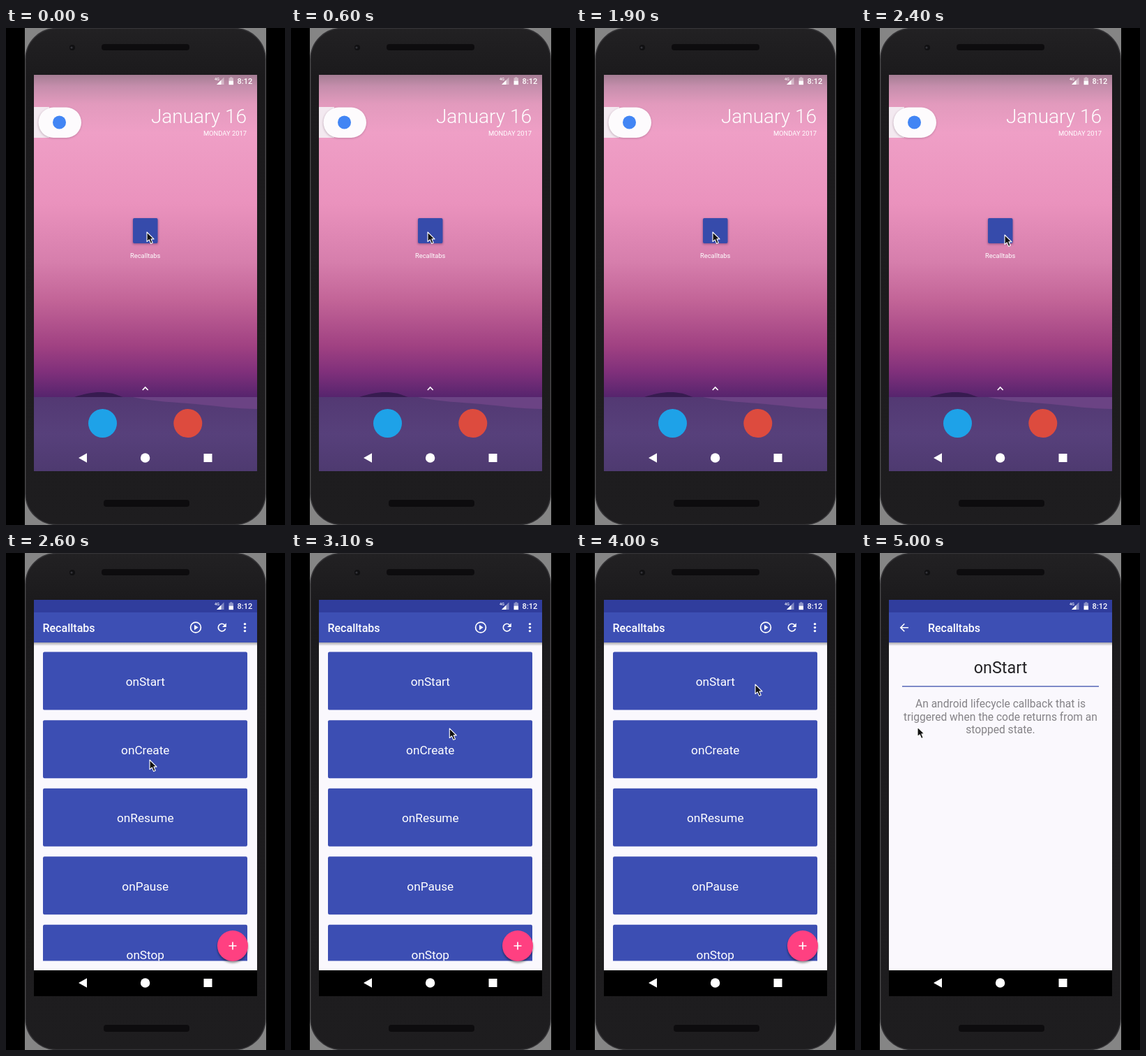
These frames come from a looping animation (400x711 px, 5100 ms). An HTML page:

```html
<!DOCTYPE html>
<html lang="en">
<head>
<meta charset="utf-8">
<title>Phone demo</title>
<style>
html, body { margin: 0; width: 100%; height: 100%; overflow: hidden; background: #000; }
svg { display: block; width: 400px; height: 711px; font-family: Roboto, sans-serif; }
.mid { text-anchor: middle; }
.end { text-anchor: end; }
.bold { font-weight: 500; }
</style>
</head>
<body>
<svg viewBox="0 0 400 711">
  <defs>
    <linearGradient id="sky" x2="0" y2="1">
      <stop offset="0" stop-color="#a47d93"/>
      <stop offset=".035" stop-color="#c58eac"/>
      <stop offset=".09" stop-color="#e29abd"/>
      <stop offset=".18" stop-color="#ef9fc6"/>
      <stop offset=".4" stop-color="#ea92bd"/>
      <stop offset=".58" stop-color="#d67eac"/>
      <stop offset=".7" stop-color="#c26497"/>
      <stop offset=".84" stop-color="#a04182"/>
      <stop offset=".92" stop-color="#80307b"/>
      <stop offset="1" stop-color="#55246d"/>
    </linearGradient>
    <linearGradient id="ground" x2="0" y2="1">
      <stop offset="0" stop-color="#533973"/>
      <stop offset=".5" stop-color="#57407b"/>
      <stop offset="1" stop-color="#4e3a70"/>
    </linearGradient>
    <linearGradient id="shade" x2="0" y2="1">
      <stop offset="0" stop-opacity=".32"/>
      <stop offset="1" stop-opacity="0"/>
    </linearGradient>
    <linearGradient id="body" x2="0" y2="1">
      <stop offset="0" stop-color="#222123"/>
      <stop offset=".1" stop-color="#1b1a1c"/>
      <stop offset="1" stop-color="#1e1d1f"/>
    </linearGradient>
    <filter id="soft" x="-30%" y="-30%" width="160%" height="160%"><feGaussianBlur stdDeviation="1.6"/></filter>
    <clipPath id="listClip"><rect x="40" y="128" width="320" height="455.5"/></clipPath>
  </defs>

  <rect width="400" height="711"/>
  <rect x="27" width="346" height="711" fill="#858585"/>
  <rect x="28" y=".5" width="344" height="710" rx="44" fill="url(#body)" stroke="#353437" stroke-width="1.4"/>
  <rect x="137" y="23" width="126" height="9" rx="4" fill="#0d0c0e"/>
  <rect x="140" y="675" width="123" height="10" rx="4" fill="#0d0c0e"/>
  <circle cx="95" cy="28" r="4" fill="#101012"/>
  <circle cx="94" cy="28" r="1.6" fill="#343439"/>

  <g id="home">
    <rect x="40" y="67" width="320" height="462" fill="url(#sky)"/>
    <path d="M98 528C116 522 130 520 144 521.5S160 526 168 528Z" fill="#371b50"/>
    <rect x="40" y="528" width="320" height="106" fill="url(#ground)"/>
    <path d="M182 528H360V545C330 545 305 541 272 538S215 535 182 528Z" fill="#6b4384"/>
    <path d="M40 113H62V157H40Z" fill="#f3e9f0"/>
    <rect x="46" y="114.5" width="62" height="43.5" rx="21.7" fill="#603050" opacity=".3" filter="url(#soft)"/>
    <rect x="46.5" y="113.5" width="61.5" height="43.5" rx="21.7" fill="#fdfbfd"/>
    <circle cx="76.5" cy="135" r="9.5" fill="#4285f4"/>
    <g fill="#fff">
      <text class="end" x="345" y="136" font-size="28" font-weight="300">January 16</text>
      <text class="end" x="345" y="154" font-size="9.4">MONDAY 2017</text>
      <text class="mid name" x="199.7" y="329" font-size="9.3"></text>
    </g>
    <rect x="181.5" y="273" width="36.5" height="36.5" rx="2" fill="#3c1c4c" opacity=".4" filter="url(#soft)"/>
    <rect id="icon" x="182" y="272" width="35.5" height="36" rx="2"/>
    <path d="M195.8 518L199.7 514 203.6 518" fill="none" stroke="#fff" stroke-width="1.7"/>
    <circle cx="138.5" cy="565.5" r="20.5" fill="#1ea2e8"/>
    <circle cx="260.8" cy="565.5" r="20.5" fill="#dd4b3e"/>
  </g>

  <g id="app">
    <rect x="40" y="67" width="320" height="567" fill="#faf8fd"/>
    <g id="list">
      <g id="cards" clip-path="url(#listClip)"></g>
      <circle cx="325" cy="564.5" r="22" opacity=".4" filter="url(#soft)"/>
      <circle cx="325" cy="562" r="22" fill="#ff4081"/>
      <path d="M319.5 562H330.5M325 556.5V567.5" stroke="#fff" stroke-width="1.7"/>
    </g>
    <g id="detail">
      <text class="mid" x="200" y="171.8" font-size="23.4" fill="#242326">onStart</text>
      <path d="M59 190.7H341" stroke="#5969b8" stroke-width="1.5"/>
      <g class="mid" font-size="15.6" fill="#858387">
        <text x="200" y="221">An android lifecycle callback that is</text>
        <text x="200" y="239.5">triggered when the code returns from an</text>
        <text x="200" y="258">stopped state.</text>
      </g>
    </g>
    <rect x="40" y="128" width="320" height="5" fill="url(#shade)"/>
    <rect x="40" y="67" width="320" height="18.5" fill="#303d9d"/>
    <rect x="40" y="85" width="320" height="43" fill="#3d4fb4"/>
    <text id="title" class="name bold" y="113" font-size="16" fill="#fff"></text>
    <g id="tools" fill="none" stroke="#fff" stroke-width="1.7">
      <circle cx="272" cy="106.5" r="7.4"/>
      <path d="M270 102.8L275.6 106.5 270 110.2Z" fill="#fff" stroke="none"/>
      <path d="M314.6 108.2A5.3 5.3 0 1 1 313.3 102.8"/>
      <path d="M315.8 100.2V106H310Z" fill="#fff" stroke="none"/>
      <g fill="#fff" stroke="none">
        <circle cx="342.5" cy="101.6" r="1.7"/>
        <circle cx="342.5" cy="106.6" r="1.7"/>
        <circle cx="342.5" cy="111.6" r="1.7"/>
      </g>
    </g>
    <path id="back" d="M68 106.7H57M62.3 101.2L56.8 106.7 62.3 112.2" fill="none" stroke="#fff" stroke-width="1.6"/>
    <rect x="40" y="597" width="320" height="37"/>
  </g>

  <g fill="#fff">
    <text class="end bold" x="353.3" y="80" font-size="11">8:12</text>
    <text class="bold" x="299" y="75" font-size="5.5">4G</text>
    <path d="M302 81L312.5 70.5V81Z" opacity=".4"/>
    <path d="M302 81L308.5 74.5V81Z"/>
    <path d="M319.5 71.5H321.3V70.2H324.2V71.5H326V75.5H319.5Z" opacity=".45"/>
    <rect x="319.5" y="75.5" width="6.5" height="5.7"/>
    <path d="M104 615L116 608.3V621.7Z"/>
    <circle cx="199.6" cy="615" r="6.7"/>
    <rect x="283.5" y="609" width="12" height="12"/>
  </g>
  <path id="cursor" d="M0 0V13.6L3.2 10.8 5.6 16.4 8.2 15.3 5.9 9.9H10Z" fill="#111" stroke="#fff" stroke-width="1.1" stroke-linejoin="round"/>
</svg>
<script>
const LOOP = 5100, STEP = 100;
const OPEN = 2500, DETAIL = 4200;
const PRESS = [1300, 1900];
const $ = id => document.getElementById(id);
const show = (id, on) => $(id).setAttribute("display", on ? "inline" : "none");

// Pointer stops: time, x, y
const stops = [
  [0, 202, 292], [500, 196, 292], [1900, 196, 292], [2300, 206, 296],
  [2700, 206, 296], [3600, 257, 188], [4200, 257, 188], [4900, 81, 249]
];

document.querySelectorAll(".name").forEach(el => el.textContent = "Recalltabs");
$("cards").innerHTML = ["onStart", "onCreate", "onResume", "onPause", "onStop"].map((label, i) => {
  const y = 141.6 + i * 97.55;
  return `<rect x="53" y="${y}" width="293" height="83" rx="2.2" fill="#3c4eb3"/>
    <text class="mid" x="199.8" y="${y + 48.7}" font-size="17.2" fill="#fff">${label}</text>`;
}).join("");

function pointer(t) {
  const i = stops.findIndex(s => s[0] > t);
  if (i < 0) return stops[stops.length - 1].slice(1);
  const [t0, x0, y0] = stops[i - 1], [t1, x1, y1] = stops[i];
  const p = (t - t0) / (t1 - t0), e = p * p * (3 - 2 * p);
  return [x0 + (x1 - x0) * e, y0 + (y1 - y0) * e];
}

function draw(t) {
  const detail = t >= DETAIL;
  show("home", t < OPEN);
  show("app", t >= OPEN);
  show("list", !detail);
  show("tools", !detail);
  show("detail", detail);
  show("back", detail);
  $("title").setAttribute("x", detail ? 96 : 52.5);
  $("icon").setAttribute("fill", t >= PRESS[0] && t < PRESS[1] ? "#7381b9" : "#364bab");
  $("cursor").setAttribute("transform", `translate(${pointer(t)})`);
}

function tick() {
  draw(Math.floor(performance.now() % LOOP / STEP) * STEP);
  requestAnimationFrame(tick);
}
tick();
</script>
</body>
</html>
```
